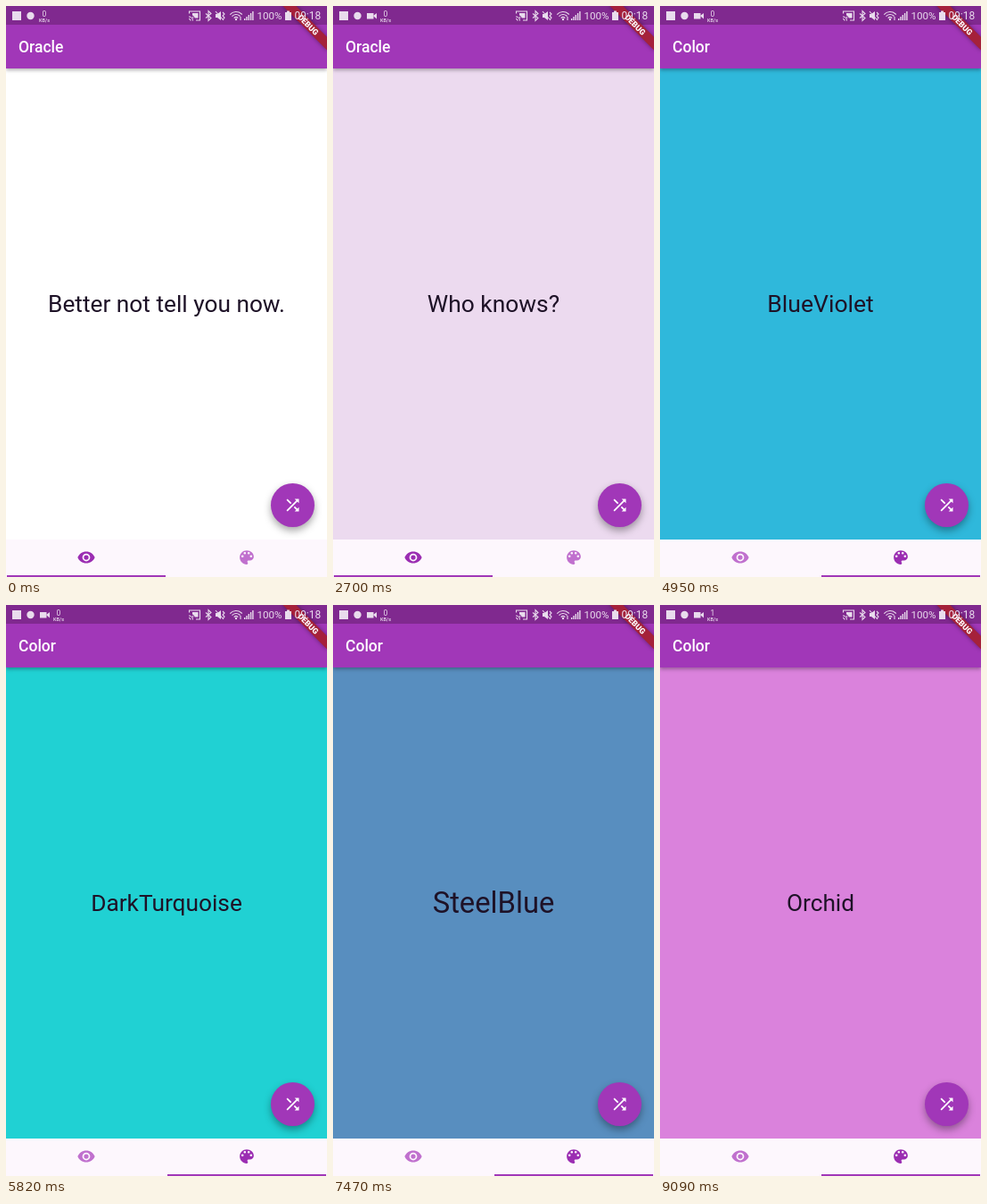
Recreate the animation shown at these times as an HTML page with a canvas. Size 360 px wide and 640 px high, loop 9.12 s.

```html
<!DOCTYPE html>
<html lang="en">
<head>
<meta charset="utf-8">
<title>Oracle</title>
<style>
  html, body { margin: 0; width: 100%; height: 100%; overflow: hidden; background: #fff; }
  canvas { display: block; width: 360px; height: 640px; }
</style>
</head>
<body>
<canvas id="stage" width="360" height="640"></canvas>
<script>
const ctx = document.getElementById('stage').getContext('2d');
const LOOP = 9120, W = 360, BAR = 70, NAV = 598;
const SWAP = 550, FADE = 500, SWIPE_START = 3765, SWIPE_TIME = 765;
const PURPLE = '#a137b8', INK = '#1e1227', PALE = '#e9dced';
const WHITE = [255, 255, 255], LILAC = [224, 195, 230];

const pages = [
  {
    title: 'Oracle', text: 'Better not tell you now.', color: WHITE,
    presses: [
      { at: 105, text: 'Without a doubt.', color: LILAC },
      { at: 1280, text: 'Who knows?', color: WHITE },
      { at: 2520, text: 'Most likely.', color: LILAC }
    ]
  },
  {
    title: 'Color', text: 'BlueViolet', color: [146, 62, 232],
    presses: [
      { at: 4695, text: 'DarkTurquoise', color: [24, 212, 216] },
      { at: 5795, text: 'Coral', color: [255, 116, 77] },
      { at: 6810, text: 'SteelBlue', color: [88, 142, 191] },
      { at: 7900, text: 'Orchid', color: [218, 130, 220] }
    ]
  }
];

const shuffleIcon = new Path2D('M10.59 9.17L5.41 4 4 5.41l5.17 5.17 1.42-1.41zM14.5 4l2.04 2.04L4 18.59 5.41 20 17.96 7.46 20 9.5V4h-5.5zm.33 9.41l-1.41 1.41 3.13 3.13L14.5 20H20v-5.5l-2.04 2.04-3.13-3.13z');
const eyeIcon = new Path2D('M12 4.5C7 4.5 2.73 7.61 1 12c1.73 4.39 6 7.5 11 7.5s9.27-3.11 11-7.5c-1.73-4.39-6-7.5-11-7.5z');
const paletteIcon = new Path2D('M12 3c-4.97 0-9 4.03-9 9s4.03 9 9 9c.83 0 1.5-.67 1.5-1.5 0-.39-.15-.74-.39-1.01-.23-.26-.38-.61-.38-.99 0-.83.67-1.5 1.5-1.5H16c2.76 0 5-2.24 5-5 0-4.42-4.03-8-9-8z');

function addCircle(path, x, y, r) {
  path.moveTo(x + r, y);
  path.arc(x, y, r, 0, Math.PI * 2);
}
addCircle(eyeIcon, 12, 12, 5);
addCircle(eyeIcon, 12, 12, 3);
[[6.5, 10.5], [9.5, 6.5], [14.5, 6.5], [17.5, 10.5]].forEach(([x, y]) => addCircle(paletteIcon, x, y, 1.5));

const clamp = v => Math.min(1, Math.max(0, v));
const mix = (a, b, k) => a.map((v, i) => v + (b[i] - v) * k);
const rgb = c => `rgb(${c.map(Math.round).join()})`;
const elasticOut = u => 1 + 2 ** (-10 * u) * Math.sin((u - 0.1) * 5 * Math.PI);

// cubic-bezier(.25, .1, .25, 1)
function ease(x) {
  let lo = 0, hi = 1;
  const curve = (a, b, s) => 3 * a * s * (1 - s) ** 2 + 3 * b * s * s * (1 - s) + s ** 3;
  for (let i = 0; i < 24; i++) {
    const s = (lo + hi) / 2;
    if (curve(0.25, 0.25, s) < x) lo = s; else hi = s;
  }
  return curve(0.1, 1, lo);
}

function pageState(page, t) {
  let { text, color } = page, scale = 1;
  for (const press of page.presses) {
    const age = t - press.at;
    if (age < 0) break;
    color = mix(color, press.color, ease(clamp(age / FADE)));
    if (age < SWAP) {
      scale = elasticOut(1 - age / SWAP);
    } else {
      text = press.text;
      scale = age < 2 * SWAP ? elasticOut(age / SWAP - 1) : 1;
    }
  }
  return { text, color, scale };
}

function swipe(t) {
  const u = clamp((t - SWIPE_START) / SWIPE_TIME);
  return 1 - (1 - u) ** 7 * (1 + 7 * u);
}

function rect(color, x, y, w, h) {
  ctx.fillStyle = color;
  ctx.fillRect(x, y, w, h);
}

function dot(color, x, y, r) {
  ctx.fillStyle = color;
  ctx.beginPath();
  ctx.arc(x, y, r, 0, Math.PI * 2);
  ctx.fill();
}

function poly(points, closed) {
  ctx.beginPath();
  points.forEach(([x, y]) => ctx.lineTo(x, y));
  if (closed) ctx.fill(); else ctx.stroke();
}

function label(text, x, y, size, weight = 400, align = 'left') {
  ctx.font = `${weight} ${size}px Roboto, sans-serif`;
  ctx.textAlign = align;
  ctx.fillText(text, x, y);
}

function icon(path, x, y, color) {
  ctx.save();
  ctx.translate(x, y);
  ctx.scale(0.875, 0.875);
  ctx.translate(-12, -12);
  ctx.fillStyle = color;
  ctx.fill(path, 'evenodd');
  ctx.restore();
}

function withShadow(blur, dy, alpha, draw) {
  ctx.save();
  ctx.shadowColor = `rgba(0,0,0,${alpha})`;
  ctx.shadowBlur = blur;
  ctx.shadowOffsetY = dy;
  draw();
  ctx.restore();
}

function drawPage(page, t, x) {
  if (Math.abs(x) >= W) return;
  const { text, color, scale } = pageState(page, t);
  ctx.save();
  ctx.translate(x, 0);
  ctx.beginPath();
  ctx.rect(0, 0, W, NAV);
  ctx.clip();
  rect(rgb(color), 0, BAR, W, NAV - BAR);

  if (scale > 0.001) {
    ctx.save();
    ctx.translate(180, 334);
    ctx.scale(scale, scale);
    ctx.fillStyle = INK;
    label(text, 0, 9, 26.25, 400, 'center');
    ctx.restore();
  }

  withShadow(4, 1.5, 0.3, () => rect(PURPLE, 0, 0, W, BAR));
  ctx.fillStyle = '#fff';
  label(page.title, 14, 52, 17.5, 500);
  withShadow(8, 4, 0.35, () => dot(PURPLE, 321.5, 559.5, 24.5));
  icon(shuffleIcon, 321.5, 559.5, '#fff');
  ctx.restore();
}

function drawNav(p) {
  rect('#fdf7fd', 0, NAV, W, 640 - NAV);
  const tint = k => rgb(mix([192, 112, 206], [155, 45, 178], k));
  const picked = clamp(p);
  icon(eyeIcon, 90, 618, tint(1 - picked));
  icon(paletteIcon, 270, 618, tint(picked));
  rect('#a137b8', 1 + 180 * p, 638, 178, 2);
}

function drawBanner() {
  ctx.save();
  ctx.translate(W, 0);
  ctx.rotate(Math.PI / 4);
  withShadow(5, 0, 0.4, () => rect('#a5213a', -35, 24.5, 70, 10.5));
  ctx.fillStyle = '#fff';
  label('DEBUG', 0, 33, 8.9, 900, 'center');
  ctx.restore();
}

function drawStatusIcons(t) {
  ctx.fillStyle = ctx.strokeStyle = PALE;
  ctx.lineWidth = 1.1;
  rect(PALE, 7, 6, 10, 10);
  dot(PALE, 27.5, 11, 4.2);

  const recording = t >= 120;
  if (recording) {
    rect(PALE, 38, 8, 7.5, 6.5);
    poly([[45, 11], [49, 8], [49, 14.5]], true);
  }
  const x = recording ? 59 : 43;
  label(t >= 9000 ? '1' : '0', x, 12, 8.5, 400, 'center');
  label('KB/s', x, 17.5, 5.5, 500, 'center');

  // cast
  poly([[205.5, 8.5], [205.5, 6], [217.5, 6], [217.5, 16], [213, 16]]);
  rect(PALE, 209, 8, 6.5, 5.5);
  for (const r of [2, 4.5, 7]) {
    ctx.strokeStyle = r === 7 ? '#80298f' : PALE;
    ctx.beginPath();
    ctx.arc(205, 16.5, r, -Math.PI / 2, 0);
    ctx.stroke();
  }
  ctx.strokeStyle = PALE;

  // bluetooth
  poly([[224, 8.5], [230, 13.5], [227, 16.5], [227, 5.5], [230, 8.5], [224, 13.5]]);

  // muted with vibration
  ctx.fillStyle = PALE;
  poly([[235, 9], [237, 9], [241, 6], [241, 16], [237, 13], [235, 13]], true);
  poly([[235, 6], [244, 16]]);
  poly([[243, 7], [245, 9], [243, 11], [245, 13], [243.5, 15]]);

  // wifi
  for (const r of [3, 6, 9]) {
    ctx.beginPath();
    ctx.arc(258, 15.5, r, -Math.PI * 0.77, -Math.PI * 0.23);
    ctx.stroke();
  }
  dot(PALE, 258, 15, 1.2);
  poly([[263, 12], [263, 16]]);

  // signal
  for (let i = 0; i < 5; i++) rect(PALE, 267 + i * 2.3, 14 - i * 2, 1.4, 2 + i * 2);

  ctx.fillStyle = PALE;
  label('100%', 281.5, 15.3, 11.6);
  rect(PALE, 313, 7, 7, 9);
  rect(PALE, 315, 5.5, 3, 2);
  label('09:18', 323.5, 15.3, 11.9);
}

function draw(t) {
  const p = swipe(t);
  ctx.clearRect(0, 0, W, 640);
  drawPage(pages[0], t, -W * p);
  drawPage(pages[1], t, W * (1 - p));
  drawNav(p);
  rect('#80298f', 0, 0, W, 21);
  drawBanner();
  drawStatusIcons(t);
}

function tick() {
  draw(performance.now() % LOOP);
  requestAnimationFrame(tick);
}
tick();
</script>
</body>
</html>
```
